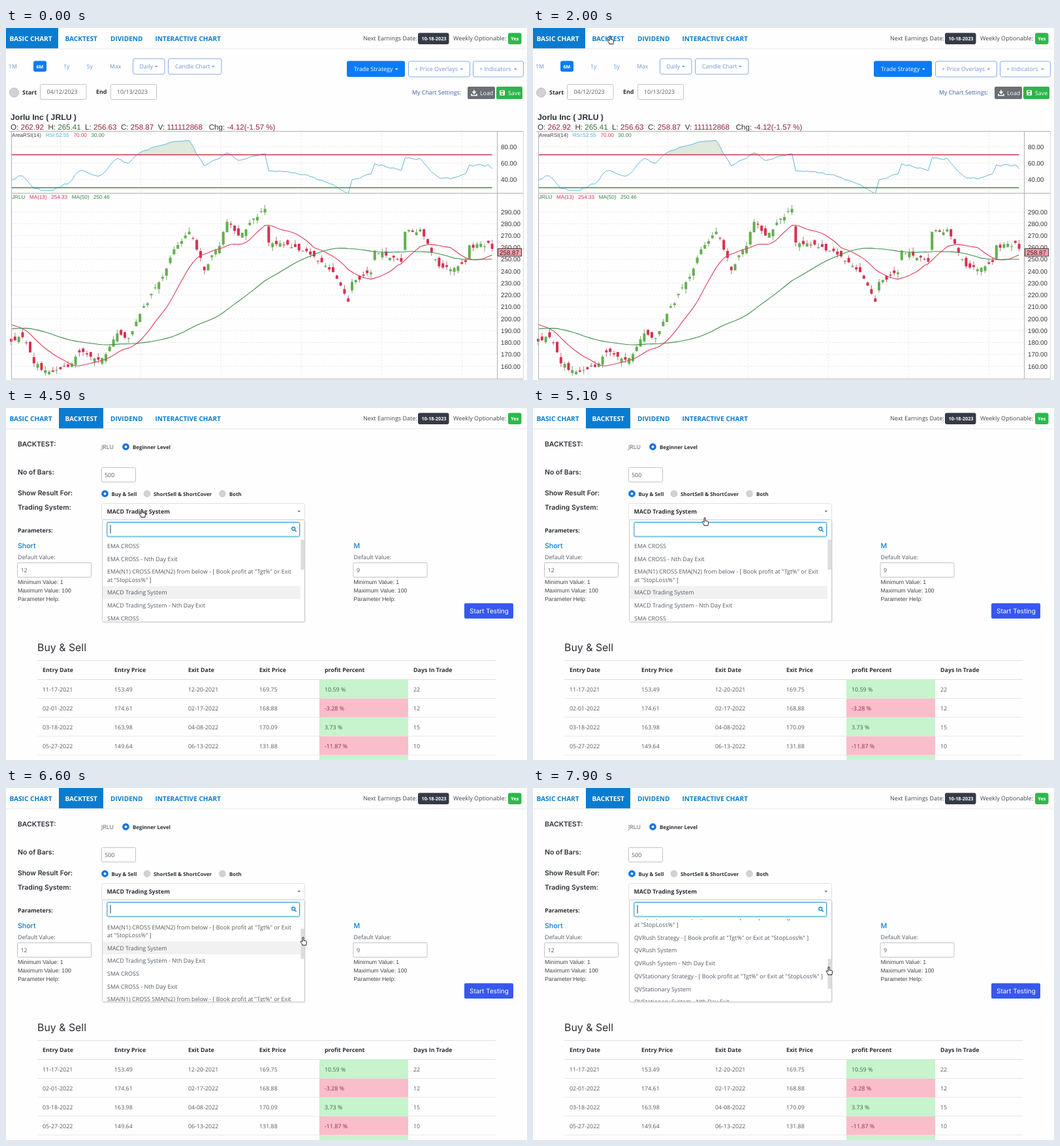
An HTML page for the animation above (8000 ms loop, 798x540 px).

```html
<!DOCTYPE html>
<html lang="en">
<head>
<meta charset="utf-8">
<title>Stock chart and backtest</title>
<style>
html, body { margin: 0; width: 798px; height: 540px; overflow: hidden; background: #fefefe; }
svg { display: block; }
text { font-family: "Open Sans", sans-serif; white-space: pre; text-rendering: geometricPrecision; }
.b { font-weight: 700; }
.a { font-family: "Liberation Sans", Arial, sans-serif; }
.p { font-family: Inter, sans-serif; }
.m { font-weight: 500; }
.s { font-weight: 600; }
</style>
</head>
<body>
<svg id="stage" width="798" height="540" viewBox="0 0 798 540"></svg>
<script>
const BLUE = '#0b7bf5', NAV = '#0a7cd0', RED = '#d9304f', GREEN = '#62b04e', LEAF = '#2e8540';
const INK = '#2b2f36', GREY = '#555b63', DROP = '#7094d8', TICKER = 'JRLU';

// Drawing helpers; text is centred vertically on y.
const text = (x, y, s, fill = GREY, size = 8.9, cls = '') =>
  `<text x="${x}" y="${y + size * .36}" fill="${fill}" font-size="${size}" class="${cls}">${s}</text>`;
const span = (s, fill) => `<tspan fill="${fill}">${s}</tspan>`;
const box = (x, y, w, h, fill = '#fff', stroke = 'none', r = 0) =>
  `<rect x="${x}" y="${y}" width="${w}" height="${h}" fill="${fill}" stroke="${stroke}" rx="${r}"/>`;
const path = (d, stroke, width = 1, fill = 'none', more = '') =>
  `<path d="${d}" stroke="${stroke}" stroke-width="${width}" fill="${fill}" ${more}/>`;
const caret = (x, y, fill) => path(`M${x} ${y}h4.6l-2.3 2.5z`, 'none', 0, fill);
const poly = pts => 'M' + pts.map(p => p.map(v => v.toFixed(1)).join(' ')).join('L');

// Linear interpolation through [position, ...values] keys.
function along(keys, t) {
  const i = keys.findIndex(k => k[0] >= t);
  if (i < 0) return keys[keys.length - 1].slice(1);
  if (i === 0) return keys[0].slice(1);
  const a = keys[i - 1], b = keys[i], u = (t - a[0]) / (b[0] - a[0]);
  return a.slice(1).map((v, k) => v + (b[k + 1] - v) * u);
}

// ---- Header ----
const tabs = [['BASIC CHART', 5.5, 0, 80], ['BACKTEST', 90.5, 81, 68],
  ['DIVIDEND', 160, 0, 0], ['INTERACTIVE CHART', 228.5, 0, 0]];
const header = active =>
  tabs.map(([s, x, bx, bw], i) =>
    (i === active ? box(bx, 0, bw, 31.5, NAV) : '') +
    text(x, 16, s, i === active ? '#fff' : NAV, 10.1, 'b')).join('') +
  path('M0 32h798', '#e4e6e8') +
  text(547, 16, 'Next Earnings Date:', '#444', 9) + box(631, 7.5, 47.5, 17.5, '#343a46', 'none', 3) +
  text(636.5, 16.5, '10-18-2023', '#fff', 7.3, 'b') +
  text(685, 16, 'Weekly Optionable:', '#444', 9) + box(769, 7.5, 20.5, 17.5, '#2db84b', 'none', 3) +
  text(773.3, 16.5, 'Yes', '#fff', 7.2, 'b');

// ---- Chart toolbar ----
function toolbar() {
  const button = (x, y, w, s, tx, cx) => box(x, y, w, 24, '#fff', '#84abe6', 3) +
    text(tx, y + 12, s, DROP) + caret(cx, y + 11, DROP);
  return [['1M', 4], ['1y', 88], ['5y', 123.5], ['Max', 159]]
    .map(([s, x]) => text(x, 59, s, DROP, 8.8)).join('') +
    box(42, 50.5, 20, 16.5, BLUE, 'none', 3) + text(46.5, 59, '6M', '#fff', 7.2, 'b') +
    button(194.5, 47, 48.5, 'Daily', 204.5, 228) +
    button(248.5, 47, 81.5, 'Candle Chart', 259, 315) +
    button(616.5, 51, 94, '+ Price Overlays', 626, 695.5) +
    button(715.5, 51, 77, '+ Indicators', 725, 778) +
    box(522, 50.5, 89, 24.5, BLUE, 'none', 3) + text(533, 63, 'Trade Strategy', '#fff') + caret(596, 62, '#fff') +
    `<circle cx="12.5" cy="99" r="7" fill="#d2d2d2" stroke="#bdbdbd"/>` +
    text(25, 99, 'Start', INK, 8.9, 'b') + box(52.5, 86.5, 70.5, 23, '#fff', '#bfc3c8', 2) + text(62.5, 98, '04/12/2023') +
    text(138, 98, 'End', INK, 8.9, 'b') + box(160.5, 86.5, 70, 23, '#fff', '#bfc3c8', 2) + text(170, 98, '10/13/2023') +
    text(622, 99, 'My Chart Settings:', '#3b5c9c') +
    box(707, 90, 42, 19, '#6b6e74', 'none', 2) + text(726, 99.5, 'Load', '#fff', 8.8) +
    path('M717 95v5m-2.5-2.5l2.5 3l2.5-3M713 101v2.5h8v-2.5', '#fff', 1.6) +
    box(751, 90, 40, 19, '#2fb34b', 'none', 2) + text(769, 99.5, 'Save', '#fff', 8.8) +
    box(756, 95.5, 8, 8, '#fff', 'none', 1) + box(757.5, 96.5, 4.5, 2, '#2fb34b') + box(759, 100, 2.4, 2.4, '#2fb34b');
}

// ---- Prices: turning points plus seeded noise; negative days precede the view ----
const DAYS = 128, BEFORE = 50;
const turns = [[-50, 167], [-38, 214], [-23, 173], [-15, 191], [-7, 207], [-3, 185], [0, 181], [3, 186], [6, 163],
  [10, 154], [16, 161], [18, 172], [24, 166], [28, 188], [31, 184], [34, 204], [40, 235], [43, 258], [47, 274],
  [51, 242], [55, 262], [57, 282], [60, 270], [67, 293], [68, 263], [71, 265], [79, 254], [85, 240], [89, 215],
  [90, 231], [95, 239], [96, 257], [103, 249], [104, 273], [108, 274], [113, 245], [116, 241], [120, 248],
  [121, 261], [126, 263], [127, 258.9]];

let seed = 11;
const random = () => (seed = seed * 16807 % 2147483647) / 2147483647;
const noise = size => (random() * 2 - 1) * size;

const series = Array.from({ length: BEFORE + DAYS }, (_, i) => along(turns, i - BEFORE)[0] + noise(1.6));
const closes = series.slice(BEFORE);
const barX = i => 8 + i * 5.8, LAST = barX(DAYS - 1);
const priceY = p => 282 + (290 - p) * 1.823;
const rsiY = v => 182 + (80 - v) * 1.26;

const average = n => closes.map((_, i) => {
  const end = BEFORE + i + 1;
  return [barX(i), priceY(series.slice(end - n, end).reduce((a, b) => a + b) / n)];
});

function rsi(n) {
  let up = 2.5, down = 2.5;
  return series.slice(1).map((p, i) => {
    const d = p - series[i], churn = .35;
    up += (Math.max(d, 0) + churn - up) / n;
    down += (Math.max(-d, 0) + churn - down) / n;
    return 100 * up / (up + down);
  }).slice(BEFORE - 1).map((v, i) => [barX(i), rsiY(v)]);
}

const candles = () => closes.map((close, i) => {
  const before = series[BEFORE + i - 1], x = barX(i);
  const open = before + (close - before) * .4 + noise(4);
  const rise = close >= open, wick = () => random() ** 1.4 * 7;
  const top = priceY(Math.max(open, close)), bottom = priceY(Math.min(open, close));
  return path(`M${x} ${top - wick()}V${bottom + wick()}`, rise ? '#6f9a66' : '#bd5566', .9) +
    box(x - 2, top, 4, Math.max(1, bottom - top), rise ? GREEN : RED);
}).join('');

function chart() {
  const label = (v, y) => text(758, y, v.toFixed(2), '#333', 9.8, 'a');
  const prices = Array.from({ length: 14 }, (_, i) => 290 - i * 10), levels = [80, 60, 40];
  const rows = [...levels.map(rsiY), ...prices.map(priceY)];
  const line = rsi(14), limit = 194.5;
  const quotes = 'O: 262.92  H: 265.41  L: 256.63  C: 258.87  V: 111112868   Chg: -4.12(-1.57 %)'
    .replace(/(\w+:) (\S+( %\))?)/g, (_, key, value) => `${key} ${span(value, key === 'H:' ? '#35703a' : '#922338')}`);
  const legend = (y, ...parts) => text(9, y, parts.map(p => span(...p)).join('   '), GREY, 8.1, 'a');
  return text(7, 137, `Jorlu Inc ( ${TICKER} )`, INK, 12.2, 'a b') + text(7, 152, quotes, '#333', 11.6, 'a') +
    path(rows.map(y => `M8 ${y}H752`).join('') +
      [...Array(6).keys()].map(i => `M${barX(13 + i * 21.2)} 159V538`).join(''),
      '#ececec', 1, 'none', 'stroke-dasharray="3 2"') +
    path(poly([[8, limit], ...line.map(([x, y]) => [x, Math.min(y, limit)]), [LAST, limit]]), 'none', 0, '#dfe9dc') +
    path(poly(line), '#62b4df') +
    path(`M8 ${limit}H${LAST}`, '#c93247', 1.3) + path(`M8 245H${LAST}`, '#3e8a48', 1.3) +
    candles() +
    path(poly(average(13)), '#dc4058', 1.1) + path(poly(average(50)), '#3f8c4b', 1.1) +
    path('M5 158.5H792M8 253.5H792M8 538.5H792M8.5 158V539M752.5 158V539', '#b0b0b0') +
    path('M792.5 158V539', '#dcdcdc') +
    levels.map(v => label(v, rsiY(v))).join('') + prices.map(v => label(v, priceY(v))).join('') +
    box(753.5, 338.5, 36, 11.5, '#f2a3ad', '#55333a') + text(756, 344.3, '258.87', '#3b1c22', 9.8, 'a') +
    legend(164.5, ['AreaRSI(14)', '#444'], ['RSI:52.55', '#4fabd9'], ['70.00', RED], ['30.00', LEAF]) +
    legend(259, [TICKER, LEAF], ['MA(13)', RED], ['254.33', RED], ['MA(50)', LEAF], ['250.46', LEAF]);
}

// ---- Backtest form ----
function radio(x, y, on) {
  const [fill, edge] = on ? ['#0a74de', '#0a74de'] : ['#d2d2d2', '#c2c2c2'];
  return `<circle cx="${x}" cy="${y}" r="5" fill="${fill}" stroke="${edge}" stroke-width=".6"/>` +
    (on ? `<circle cx="${x}" cy="${y}" r="2" fill="#fff"/>` : '');
}

function parameter(x, name, value) {
  return text(x, 211, name, NAV, 10.6, 'p m') + text(x, 229, 'Default Value:') +
    box(x - .5, 237.5, 113, 22, '#fff', '#bfc3c8', 1) + text(x + 4.5, 249, value) +
    ['Minimum Value: 1', 'Maximum Value: 100', 'Parameter Help:']
      .map((s, i) => text(x, 267 + i * 13, s, '#444', 8.8, 'a')).join('');
}

function table() {
  const cols = [56, 166, 279, 388, 488, 624];
  const heads = ['Entry Date', 'Entry Price', 'Exit Date', 'Exit Price', 'profit Percent', 'Days In Trade'];
  const rows = ['11-17-2021 153.49 12-20-2021 169.75 10.59 22', '02-01-2022 174.61 02-17-2022 168.88 -3.28 12',
    '03-18-2022 163.98 04-08-2022 170.09 3.73 15', '05-27-2022 149.64 06-13-2022 131.88 -11.87 10'];
  return text(48, 367.5, 'Buy &amp; Sell', INK, 15.9, 'p') +
    heads.map((s, i) => text(cols[i], 402, s, INK, 8.9, 'b')).join('') +
    rows.map((row, r) => {
      const cells = row.split(' '), y = 417 + r * 28.9, loss = cells[4] < 0;
      return box(480, y, 136, 28.9, loss ? '#fabdca' : '#c7f3cd') +
        path(`M48 ${y + 28.5}H480M616 ${y + 28.5}H750`, '#e6e8ea') +
        cells.map((s, i) => text(cols[i], y + 14.6, i === 4 ? s + ' %' : s,
          i !== 4 ? GREY : loss ? '#922f45' : '#356e3d')).join('');
    }).join('') + box(480, 533, 136, 7, '#c7f3cd') +
    path('M48 387.5H750M48 416.5H750', '#dddfe2');
}

const form = () =>
  [['BACKTEST:', 55], ['No of Bars:', 98], ['Show Result For:', 130], ['Trading System:', 152.5]]
    .map(([s, y]) => text(18, y, s, INK, 10.4, 'p s')).join('') +
  text(146, 60, TICKER) + radio(183.5, 59.5, true) + text(194, 60, 'Beginner Level', INK, 7.9, 'b') +
  box(146.5, 91.5, 52, 22, '#fff', '#bfc3c8', 1) + text(151, 103, '500') +
  radio(151.5, 131.5, true) + text(161.5, 132, 'Buy &amp; Sell', INK, 7.9, 'b') +
  radio(216, 131.5) + text(226, 132, 'ShortSell &amp; ShortCover', INK, 7.9, 'b') +
  radio(331.5, 131.5) + text(342, 132, 'Both', INK, 7.9, 'b') +
  box(146.5, 146.5, 311, 25, '#fff', '#dfe1e4', 3) +
  text(154.5, 158.5, 'MACD Trading System', INK, 8.9, 'b') + caret(446.5, 157.5, '#666') +
  text(18, 188, 'Parameters:', INK, 8.8, 'b') +
  parameter(18, 'Short', 12) + parameter(275, 'Long', 26) + parameter(532.5, 'M', 9) +
  box(702, 299.5, 75, 23.5, '#3758ee', 'none', 2) + text(710, 311.5, 'Start Testing', '#fff', 10, 'p') +
  table();

// ---- System list ----
const rule = '[ Book profit at "Tgt%" or Exit', stop = 'at "StopLoss%" ]';
const cross = k => [`${k} CROSS`, `${k} CROSS - Nth Day Exit`, `${k}(N1) CROSS ${k}(N2) from below - ${rule}|${stop}`];
const house = k => [`${k} Strategy - ${rule} ${stop}`, `${k} System`, `${k} System - Nth Day Exit`];
const systems = [...cross('EMA'), 'MACD Trading System', 'MACD Trading System - Nth Day Exit',
  ...cross('SMA'), ...house('QVRush'), ...house('QVStationary')];

function list() {
  let y = 201.6;
  return systems.map(s => {
    const lines = s.split('|'), top = y, h = 19.7 + 12.4 * (lines.length - 1);
    y += h;
    return (s === 'MACD Trading System' ? box(148, top, 303, h, '#f1f1f1') : '') +
      lines.map((l, k) => text(155, top + 10 + 12.4 * k, l, GREY, 8.95)).join('');
  }).join('');
}

const dropdown = () =>
  box(148, 173, 311, 157, '#00000012', 'none', 2) + box(147.5, 171.5, 310, 156.5, '#fff', '#c9ccd0', 2) +
  box(153.8, 174.3, 297, 24, 'none', '#bfe2f5', 3) + box(155, 175.5, 294.5, 21.5, '#fff', '#2f9bd3', 2) +
  `<circle cx="440.3" cy="185.3" r="2.5" fill="none" stroke="#2088c8" stroke-width="1.4"/>` +
  path('M442.2 187.2l2.6 2.6', '#2088c8', 1.6) +
  path('M160 179.5v13', '#333', 1, 'none', 'id="caret"') +
  `<g clip-path="url(#view)"><g id="list">${list()}</g></g>` +
  `<rect id="thumb" x="451.5" y="202" width="6" height="46" fill="#dcdcdc"/>`;

const pointers =
  path('M0 0v9.5l2.2-2l1.6 3.4l1.6-.8l-1.6-3.2h3z', '#222', .9, '#fff', 'id="arrow"') +
  path('M-1 1Q0-.6 1 1V5.5L4.6 6.2Q5.8 6.6 5.6 8L5 11V12.6H-1.2V11.2L-3.8 7.8Q-4.2 6.2-2.6 6.4L-1 7.6z', '#222', 1, '#fff', 'id="hand"');

const stage = document.getElementById('stage');
stage.innerHTML =
  '<clipPath id="view"><rect x="148" y="201" width="303.5" height="126.5"/></clipPath>' +
  `<g id="chartPage">${header(0)}${toolbar()}${chart()}</g>` +
  `<g id="testPage">${header(1)}${form()}<g id="dropdown">${dropdown()}</g></g>` +
  `<g id="pointer">${pointers}</g>`;

// ---- Timeline ----
const LOOP = 8000, ENTER = 1200, SWITCH = 2300, OPEN = 4400;
const pointerKeys = [[ENTER, 240, 300], [1800, 118, 12], [2350, 118, 12], [2750, 368, 133], [3400, 368, 133],
  [4000, 208, 155], [4900, 208, 155], [5800, 455, 212], [6200, 455, 212], [7100, 455, 249], [7900, 453, 274]];
const scrollKeys = [[6250, 0], [7100, 91.3], [7900, 164.5]];
const el = Object.fromEntries([...stage.querySelectorAll('[id]')].map(node => [node.id, node]));
const show = (node, on) => node.setAttribute('display', on ? 'inline' : 'none');

function draw(now) {
  const t = now % LOOP;
  const [x, y] = along(pointerKeys, t), [scroll] = along(scrollKeys, t);
  const testing = t >= SWITCH;
  const linked = y < 26 || testing && x > 146 && x < 458 && y > 146;
  show(el.chartPage, !testing);
  show(el.testPage, testing);
  show(el.dropdown, t >= OPEN);
  show(el.caret, (t - 4480) % 1060 < 530);
  el.list.setAttribute('transform', `translate(0 ${-scroll})`);
  el.thumb.setAttribute('y', 202 + scroll / 2.74);
  show(el.pointer, t >= ENTER);
  show(el.arrow, !linked);
  show(el.hand, linked);
  el.pointer.setAttribute('transform', `translate(${x} ${y})`);
}

const start = performance.now();
function tick() {
  draw(performance.now() - start);
  requestAnimationFrame(tick);
}
draw(0);
requestAnimationFrame(tick);
</script>
</body>
</html>
```
